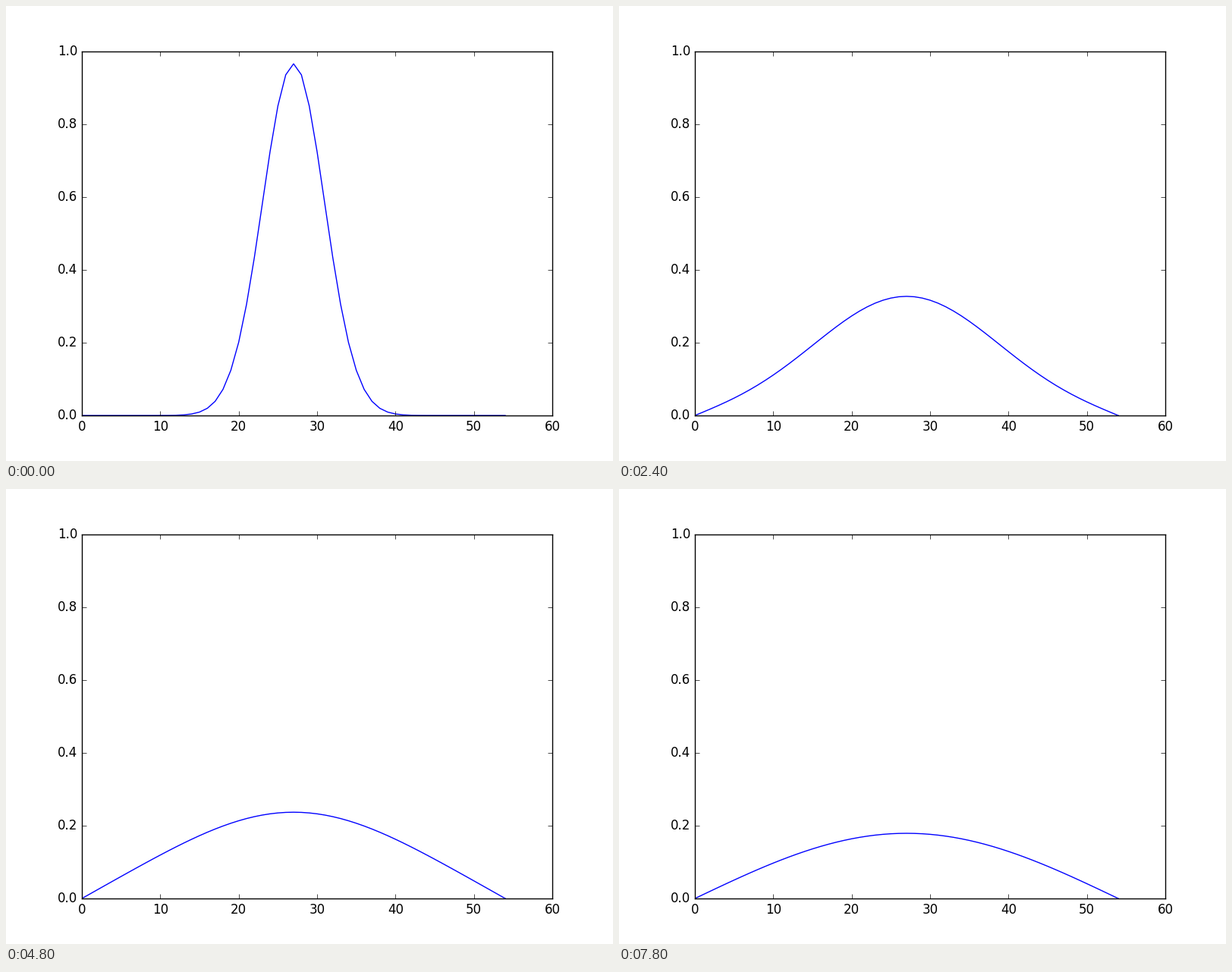
Write a matplotlib script that moves like this. It is 800 px wide and 600 px high and loops after 8000 ms.

```python
import numpy as np
import matplotlib.pyplot as plt
from matplotlib.animation import FuncAnimation

plt.style.use("classic")
plt.rcParams["font.family"] = "DejaVu Sans"

N = 55            # grid points on a rod of length 1
R = 0.5           # diffusion number of the explicit scheme
FRAMES = 40
STEPS = 10        # time steps between two frames


def step(u):
    """One explicit heat-equation step with both ends held at zero."""
    new = np.zeros_like(u)
    new[1:-1] = u[1:-1] + R * (u[2:] - 2 * u[1:-1] + u[:-2])
    return new


def solve():
    x = np.linspace(0, 1, N)
    u = step(np.exp(-100 * (x - 0.5) ** 2))
    history = [u]
    for _ in range(FRAMES - 1):
        for _ in range(STEPS):
            u = step(u)
        history.append(u)
    return history


history = solve()

fig = plt.figure(figsize=(8, 6), dpi=100, facecolor="white")
ax = fig.add_axes([0.125, 0.1, 0.775, 0.8])
ax.set_xlim(0, 60)
ax.set_ylim(0, 1)
line, = ax.plot(np.arange(N), history[0], color="#0000ff", lw=1)


def update(i):
    line.set_ydata(history[i])
    return line,


anim = FuncAnimation(fig, update, frames=FRAMES, interval=200,
                     repeat=True, repeat_delay=0, blit=False)
plt.show()
```
